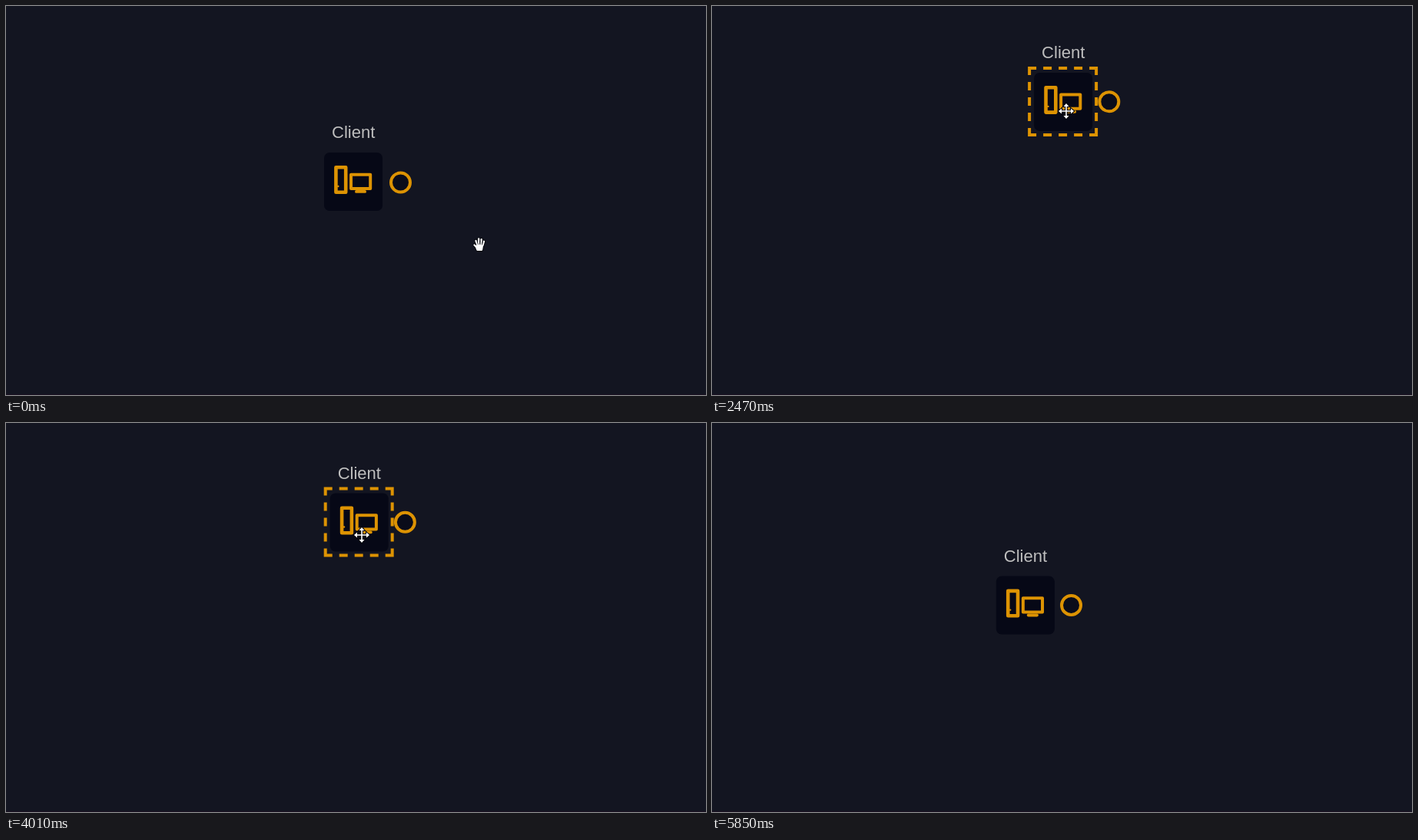
Animation of 911x507 px, one loop 6.22 s. Source, as an HTML page:

```html
<!DOCTYPE html>
<html lang="en">
<head>
<meta charset="utf-8">
<title>Dragging a node</title>
<style>
  html, body { margin: 0; width: 100%; height: 100%; overflow: hidden; background: #131521; }
  svg { display: block; }
  .line { fill: none; stroke: #dd9303; stroke-width: 4; }
  text { font: 22px "Liberation Sans", Arial, sans-serif; fill: #bebebe; }
</style>
</head>
<body>
<svg width="911" height="507" viewBox="0 0 911 507">
  <rect y="506" width="911" height="1" fill="#1a1021"/>
  <g id="node">
    <text x="424" y="172">Client</text>
    <rect x="414" y="191" width="76" height="76" rx="7" fill="#060816"/>
    <g class="line" stroke-linejoin="round">
      <rect x="429.4" y="210.3" width="12.8" height="32.4" style="stroke-width:4.6"/>
      <rect x="449" y="219.7" width="25.2" height="18.2"/>
    </g>
    <g fill="#dd9303">
      <rect x="454" y="240" width="15" height="3.8" rx="1.9"/>
      <circle cx="432.3" cy="235" r="1.2"/>
    </g>
    <path id="outline" class="line" stroke-dasharray="11 9"
      d="M406 185H497 M406 272H497 M408 183V274 M495 183V274"/>
  </g>
  <circle id="ring" class="line" cx="513.5" cy="230" r="12.5" style="fill:#0a0c1a"/>
  <g id="hand" stroke-linecap="round" stroke-linejoin="round">
    <path id="shape" fill="none" stroke="#05060c" stroke-width="4.2"
      d="M-4.5-5L-2.5 0M-.8-7.5V0M2.7-6.8L2.2 0M6-4.2L4.5 1M-6.5 .5L-3 4M-3 1H4L3 6.8H-2.5L-4 3Z"/>
    <path fill="#fff" stroke="#fff" stroke-width="2.3"
      d="M-4.5-5L-2.5 0M-.8-7.5V0M2.7-6.8L2.2 0M6-4.2L4.5 1M-6.5 .5L-3 4M-3 1H4L3 6.8H-2.5L-4 3Z"/>
    <path d="M-2.8-4L-1.6-.5M1-5V-.5M4.4-4L3.6 0" fill="none" stroke="#05060c" stroke-width=".8"/>
  </g>
  <path id="move" fill="#fff" stroke="#05060c" stroke-width="2" paint-order="stroke"
    d="M0-10L3.5-6H.8V-.8H6V-3.5L10 0L6 3.5V.8H.8V6H3.5L0 10L-3.5 6H-.8V.8H-6V3.5L-10 0L-6-3.5V-.8H-.8V-6H-3.5Z"/>
</svg>
<script>
const LOOP = 6220;
const $ = id => document.getElementById(id);

// The node is swung around its start: time in ms, angle in degrees, radius
const swing = [
  [2000, 15, 0], [2470, 87, 104], [2600, 126, 133], [3110, 179, 173], [3230, 199, 147],
  [3450, 280, 119], [3650, 329, 162], [3860, 402, 123], [4400, 547, 46], [4520, 551, 45]
];
// The cursor's way out: time in ms, x, y
const exit = [[5100, 276, 322], [5430, 424, 292], [5760, 725, 460], [5850, 810, 530]];

const ramp = (t, a, b) => Math.min(1, Math.max(0, (t - a) / (b - a)));
const ease = u => u * u * (3 - 2 * u);

// Smooth curve through the rows of a track
function along(track, t) {
  const last = track.length - 1;
  const next = track.findIndex(row => row[0] > t);
  if (next < 1) return track[next ? last : 0].slice(1);
  const i = next - 1;
  const span = track[next][0] - track[i][0];
  const u = (t - track[i][0]) / span;
  const slope = (k, c) => k === 0 || k === last ? 0 :
    (track[k + 1][c] - track[k - 1][c]) / (track[k + 1][0] - track[k - 1][0]);
  return [1, 2].map(c =>
    track[i][c] + (track[next][c] - track[i][c]) * ease(u) +
    span * u * (1 - u) * (slope(i, c) * (1 - u) - slope(next, c) * u));
}

function nodeAt(t) {
  const [degrees, radius] = along(swing, t);
  const angle = degrees * Math.PI / 180;
  return [radius * Math.cos(angle), -radius * Math.sin(angle)];
}

// Eased move from a to b, sagging by bow in the middle
function glide(t, start, end, a, b, bow) {
  const u = ease(ramp(t, start, end));
  return [a[0] + (b[0] - a[0]) * u, a[1] + (b[1] - a[1]) * u + bow * Math.sin(Math.PI * u)];
}

function cursorAt(t) {
  if (t < 1180) return glide(t, 450, 1170, [616, 311], [463, 247], 7);
  if (t >= 5100) return along(exit, t);
  if (t >= 4460) return glide(t, 4460, 4900, [415, 252], [276, 322], 0);
  const [x, y] = nodeAt(t + 12);
  return [463 + x - 2 * ramp(t, 2000, 2200), 244 + y];
}

const place = (id, x, y) => $(id).setAttribute('transform', `translate(${x} ${y})`);
const show = (id, on) => $(id).setAttribute('visibility', on ? 'visible' : 'hidden');

function draw(now) {
  const t = now % LOOP;
  const [x, y] = nodeAt(t);
  const shift = ramp(t, 2000, 2200);
  place('node', x, y);
  place('ring', x - 1.8 * shift, y - 1.2 * shift);
  $('outline').setAttribute('opacity', ramp(t, 1180, 1330) * (1 - ramp(t, 4900, 5040)));

  const [cx, cy] = cursorAt(t).map(Math.round);
  const moving = t >= 1180 && t < 4640;
  place('hand', cx, cy);
  place('move', cx, cy);
  show('hand', !moving && t < 5850);
  show('move', moving);
  requestAnimationFrame(draw);
}
requestAnimationFrame(draw);
</script>
</body>
</html>
```
